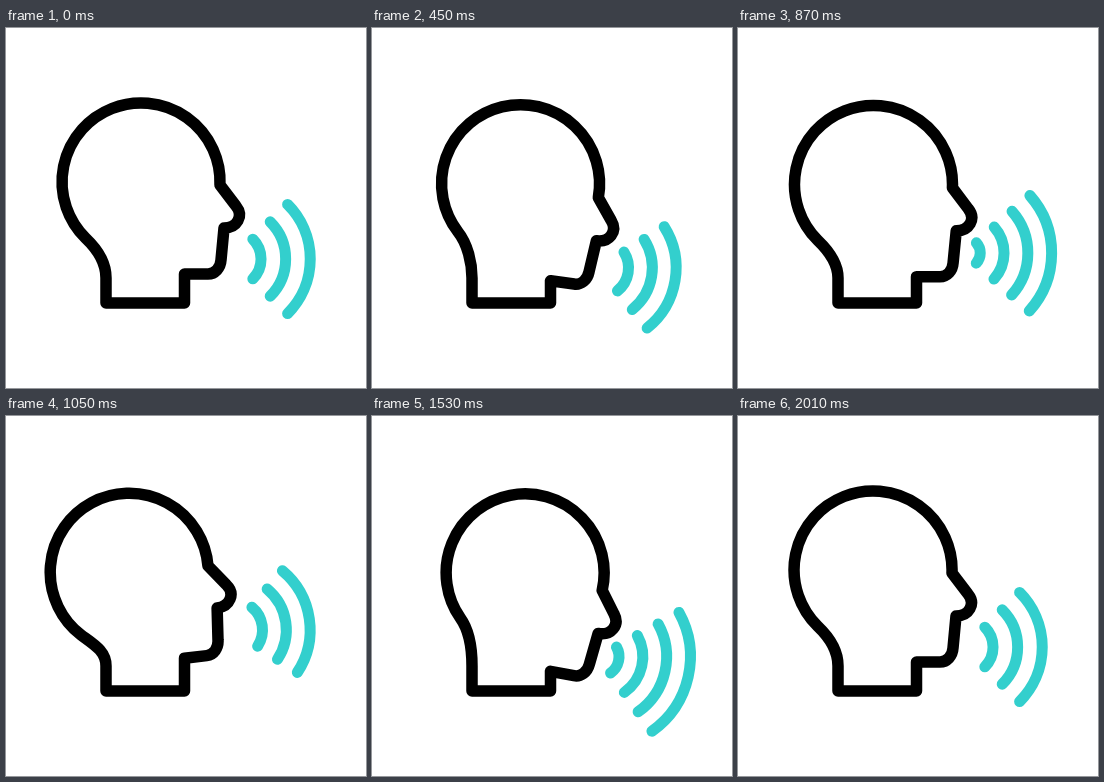
Write an HTML page that moves like this. It is 360 px wide and 360 px high and loops after 2.25 s.

```html
<!DOCTYPE html>
<html lang="en">
<head>
<meta charset="utf-8">
<title>Speaking head</title>
<style>
  html, body { margin: 0; width: 100%; height: 100%; overflow: hidden; background: #fff; }
  svg { display: block; width: 100%; height: 100%; }
  path { fill: none; stroke-width: 11; stroke-linecap: round; stroke-linejoin: round; }
  #head { stroke: #000; stroke-width: 11.5; }
  #waves { stroke: #33cfcd; }
</style>
</head>
<body>
<svg viewBox="0 0 360 360">
  <path id="head"/>
  <g id="waves"><path/><path/><path/><path/><path/></g>
</svg>
<script>
const LOOP = 2250, STEP = 30, END = 2010;
const PIVOT_X = 135, PIVOT_Y = 252;
const head = document.getElementById('head');
const waves = document.getElementById('waves');
const arcs = [...waves.children];

const clamp = x => Math.min(1, Math.max(0, x));
const smooth = x => (x = clamp(x), x * x * (3 - 2 * x));
const rad = deg => deg * Math.PI / 180;

// Rises from 0 to 1 at the start and falls back before the rest
const during = (t, rise, fall) => smooth(t / rise) * smooth((END - t) / fall);

// Nod angle in degrees: [time, angle]
const nod = [[0, 0], [172, 0], [600, 13.3], [1080, -8.6], [1475, 13.2], [END, 0]];

function tiltAt(t) {
  const i = Math.max(1, nod.findIndex(k => k[0] >= t));
  const [t0, a] = nod[i - 1], [t1, b] = nod[i];
  return a + (b - a) * smooth((t - t0) / (t1 - t0));
}

// Distance travelled by the waves, in ring spacings
function travelAt(t) {
  if (t < 300) {
    const x = t / 300;
    return 1.14 + 0.2 * x + 0.4 * x * x;
  }
  if (t < 1770) return 1.74 + (t - 300) / 300;
  const y = (t - 1770) / 240;
  return 6.64 + 0.8 * y - 0.3 * y * y;
}

function drawHead(tilt, drop) {
  const c = Math.cos(rad(tilt)), s = Math.sin(rad(tilt));
  const turn = (x, y) => [
    PIVOT_X + (x - PIVOT_X) * c - (y - PIVOT_Y) * s,
    PIVOT_Y + drop + (x - PIVOT_X) * s + (y - PIVOT_Y) * c
  ];
  const p = (x, y) => turn(x, y).map(v => v.toFixed(2)).join(' ');
  const [jx, jy] = turn(178.5, 246);
  const jawY = jy + (178.5 - jx) * s / c;
  head.setAttribute('d', `M100 275 V250 C100 235 ${p(91, 221)} ${p(79.6, 210.2)}
    A79 79 0 1 1 ${p(214, 157)} L${p(230, 178)}
    C${p(238, 188)} ${p(231, 200)} ${p(218, 200)} L${p(215, 232)}
    C${p(214.5, 240)} ${p(209, 246)} ${p(202, 246)}
    L178.5 ${jawY} V275 Z`);
}

function drawWaves(t, tilt, lift) {
  const y = 231 - 6.5 * lift + 73 * Math.sin(rad(tilt));
  waves.setAttribute('transform', `translate(227 ${y}) rotate(${tilt})`);
  const squeeze = during(t, 300, 240);
  const gap = 24.6 - 0.8 * squeeze, half = rad(45 - 3.2 * squeeze);
  const phase = travelAt(t) % 1;
  arcs.forEach((arc, i) => {
    const u = phase + i, r = u * gap;
    const x = r * Math.cos(half), h = r * Math.sin(half);
    arc.setAttribute('d', `M${x} ${-h} A${r} ${r} 0 0 1 ${x} ${h}`);
    arc.setAttribute('opacity', clamp((u - 0.25) / 0.25) * clamp((4.13 - u) / 0.29));
  });
}

const start = performance.now();
function frame() {
  const now = (performance.now() - start) % LOOP;
  const t = Math.min(END, Math.floor(now / STEP) * STEP);
  const tilt = tiltAt(t);
  const lift = during(t, 900, 430);
  drawHead(0.83 * tilt, (2.5 - 0.1 * Math.abs(tilt)) * lift);
  drawWaves(t, tilt, lift);
  requestAnimationFrame(frame);
}
frame();
</script>
</body>
</html>
```
